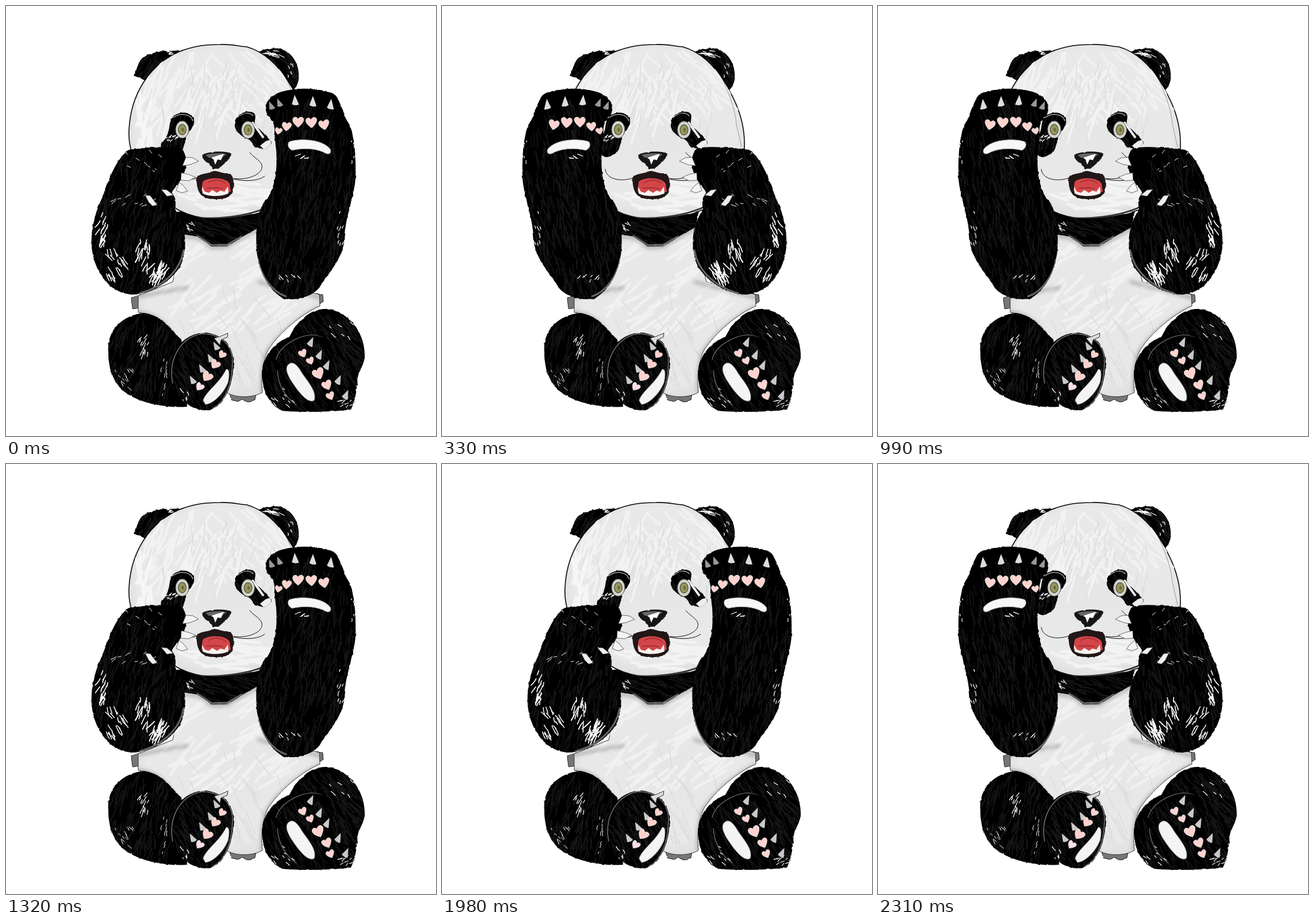
Write an HTML page that moves like this. It is 748 px wide and 748 px high and loops after 2.64 s.

```html
<!DOCTYPE html>
<html lang="en">
<head>
<meta charset="utf-8">
<title>Waving panda</title>
<style>
html, body { margin: 0; width: 100%; height: 100%; overflow: hidden; background: #fff; }
svg { display: block; width: 100vw; height: 100vh; }
</style>
</head>
<body>
<svg id="stage" viewBox="0 0 748 748">
  <defs>
    <radialGradient id="skin" cx=".5" cy=".48" r=".56">
      <stop offset="0" stop-color="#e6e6e6"/>
      <stop offset=".8" stop-color="#e9e9e9"/>
      <stop offset=".95" stop-color="#dedede"/>
      <stop offset="1" stop-color="#c8c8c8"/>
    </radialGradient>
    <filter id="soft" x="-30%" y="-30%" width="160%" height="160%"><feGaussianBlur stdDeviation="3"/></filter>
    <filter id="rough" x="-5%" y="-5%" width="110%" height="110%">
      <feTurbulence type="fractalNoise" baseFrequency=".14" numOctaves="2" seed="4"/>
      <feDisplacementMap in="SourceGraphic" scale="3" xChannelSelector="R" yChannelSelector="G"/>
    </filter>
  </defs>
  <g id="panda"></g>
</svg>
<script>
const NS = 'http://www.w3.org/2000/svg';
const STEP = 330;
const panda = document.getElementById('panda');
const defs = document.querySelector('defs');

let seed = 17;
const random = () => (seed = seed * 16807 % 2147483647) / 2147483647;
const spread = size => (random() - 0.5) * size;

function add(parent, tag, attrs = {}) {
  const node = document.createElementNS(NS, tag);
  for (const key in attrs) node.setAttribute(key, attrs[key]);
  return parent.appendChild(node);
}
const path = (parent, d, fill, attrs) => add(parent, 'path', { d, fill, ...attrs });
const line = (parent, d, width = 1, stroke = '#111') =>
  path(parent, d, 'none', { stroke, 'stroke-width': width, 'stroke-linecap': 'round' });
const oval = (parent, cx, cy, rx, ry, fill, attrs) =>
  add(parent, 'ellipse', { cx, cy, rx, ry, fill, ...attrs });

// Short curved hairs scattered over an elliptical patch; angle in degrees.
function hairs(parent, [cx, cy, rx, ry], angle, count, length, color, width = 1) {
  let d = '';
  for (let i = 0; i < count; i++) {
    const turn = random() * 2 * Math.PI, reach = Math.sqrt(random());
    const x = cx + rx * reach * Math.cos(turn), y = cy + ry * reach * Math.sin(turn);
    const a = (angle + spread(36)) * Math.PI / 180, l = length * (0.5 + random());
    const dx = Math.cos(a) * l, dy = Math.sin(a) * l;
    d += `M${x.toFixed(1)},${y.toFixed(1)}q${(dx / 2 + spread(4)).toFixed(1)},${(dy / 2).toFixed(1)} ${dx.toFixed(1)},${dy.toFixed(1)}`;
  }
  line(parent, d, width, color);
}

// A filled outline plus a group clipped to it for texture.
let clipCount = 0;
function region(parent, d, fill, attrs) {
  path(parent, d, fill, attrs);
  const id = 'clip' + clipCount++;
  path(add(defs, 'clipPath', { id }), d);
  return add(parent, 'g', { 'clip-path': `url(#${id})` });
}
function fur(parent, d, area, angle, count = 150) {
  const inner = region(parent, d, '#020202', { filter: 'url(#rough)' });
  hairs(inner, area, angle, count, 22, '#151515', 1.6);
  hairs(inner, area, angle, count / 4, 16, '#222');
  return inner;
}
const shine = (parent, area, angle, count, length = 9, width = 1.2) =>
  hairs(parent, area, angle, count, length, '#fff', width);

function heart(parent, x, y, size, turn = 0, fill = '#fcd3cf') {
  path(parent, 'M0,10C-5,6 -10,1 -9,-4C-8,-9 -2,-9 0,-4C2,-9 9,-9 10,-4C10,1 5,6 0,10Z', fill,
    { transform: `translate(${x} ${y}) rotate(${turn}) scale(${size})`, stroke: '#f5eeee', 'stroke-width': 0.8 });
}
function claw(parent, x, y, size, turn = 0, fill = '#c9c9c9') {
  path(parent, 'M-1,-10C2,-4 5,3 7,8C2,10 -3,9 -6,7Z', fill,
    { transform: `translate(${x} ${y}) rotate(${turn}) scale(${size})` });
}

function drawEars(g) {
  const left = fur(g, 'M222,121C230,108 229,93 244,86L262,80C278,76 296,80 315,75L275,130L243,131C238,126 230,125 222,121Z', [255, 103, 30, 25], 130, 40);
  shine(left, [282, 83, 10, 4], -10, 6, 7);
  const right = fur(g, 'M434,84C446,74 465,71 481,76C501,83 511,106 509,125C508,138 503,143 499,147L465,125Z', [480, 105, 30, 30], 50, 40);
  shine(right, [460, 82, 18, 5], 10, 14, 9);
  shine(right, [495, 115, 8, 18], 70, 5, 5);
}

function drawBody(g) {
  path(g, 'M231,503L218,508L220,527L232,525ZM540,500L551,503L552,514L541,520ZM389,674L392,685L403,688L411,684L421,689L433,685L435,675Z', '#777',
    { stroke: '#222', filter: 'url(#rough)' });
  const body = region(g, 'M310,390L335,402L358,418L385,418L410,402L438,386L460,480L545,502L546,522C515,535 475,568 455,600C444,625 444,650 446,672C430,682 400,682 385,673L330,590L290,580C278,552 255,535 230,533L230,504L290,480Z', 'url(#skin)', { stroke: '#333' });
  hairs(body, [375, 500, 110, 90], -38, 65, 42, '#f1f1f1', 5);
  hairs(body, [390, 560, 90, 90], 65, 35, 35, '#dedede', 2);
  line(body, 'M455,600C444,625 444,650 446,672M312,400L336,404L358,420L385,420L410,404L438,388M230,533C260,535 280,552 292,580M231,505L315,490M440,480L545,507M545,524C515,537 475,570 455,600', 6, '#77777777').setAttribute('filter', 'url(#soft)');
  const neck = fur(g, 'M296,358L450,348L440,385C425,394 416,397 408,404L385,417L358,418L333,401L308,397Z', [370, 385, 70, 28], 20, 60);
  shine(neck, [320, 382, 8, 8], 35, 7, 7);
  line(neck, 'M333,400L358,416L385,415L410,401', 3, '#666');
}

function drawHead(g) {
  const head = region(g, 'M372,67C390,66 405,70 419,71C449,80 473,102 489,130C513,165 528,204 526,248C520,300 490,343 450,356C420,367 380,371 345,369C302,363 270,340 250,310C225,280 212,247 214,215C217,153 250,102 300,80C325,70 345,67 372,67Z', 'url(#skin)', { stroke: '#080808', 'stroke-width': 1.6 });
  hairs(head, [325, 145, 90, 65], 115, 75, 38, '#f2f2f2', 4);
  hairs(head, [405, 130, 80, 55], 45, 45, 34, '#f1f1f1', 4);
  hairs(head, [370, 160, 120, 80], 100, 45, 28, '#dddddd', 1.5);
  hairs(head, [370, 330, 80, 28], 5, 30, 35, '#f3f3f3', 5);
  hairs(head, [240, 200, 16, 65], 97, 16, 34, '#f6f6f6', 5);
  line(head, 'M489,130C505,165 510,185 512,205L521,245', 1, '#999');
  line(head, 'M318,366C360,374 420,366 455,350', 3, '#333');
}

function drawFace(g) {
  const eye = (x, y) => {
    oval(g, x, y, 11.5, 15, '#d5d5cf', { stroke: '#555' });
    oval(g, x, y, 6.8, 9, '#96965e', { stroke: '#55553c', 'stroke-width': 1.4 });
    oval(g, x + 1, y, 2, 3.5, '#6a6a3c');
  };
  const left = fur(g, 'M292,191C306,181 326,185 327,199C329,212 314,221 312,231C311,248 305,260 286,263C274,261 266,245 271,237C280,230 282,221 284,212C285,203 287,195 292,191Z', [300, 225, 25, 35], 100, 30);
  shine(left, [285, 231, 12, 5], -25, 10, 6);
  line(left, 'M291,194C304,185 322,188 325,200', 1.2, '#bbb');
  const right = fur(g, 'M398,202C400,187 423,179 432,187C437,194 429,202 435,208C445,219 458,229 462,239L451,249L433,246C427,236 426,233 417,230C404,223 396,214 398,202Z', [425, 215, 30, 35], 45, 30);
  path(right, 'M442,243L452,235L462,232L460,244L450,251Z', '#eee');
  line(right, 'M429,203L447,228', 4, '#eee');
  line(right, 'M402,194C414,184 424,185 430,191', 1.2, '#bbb');
  eye(306.5, 215);
  eye(421, 215.5);

  path(g, 'M340,260C349,252 384,251 392,257C391,268 374,278 370,283L361,283C357,277 344,271 340,260Z', '#171717', { filter: 'url(#rough)' });
  path(g, 'M347,259C355,256 375,255 384,258L376,263L353,264Z', '#686868');
  path(g, 'M357,264L366,261L379,257L374,268L368,267L364,276L361,267Z', '#fff');

  line(g, 'M396,300C424,304 452,290 444,274C439,266 429,262 424,255M332,299C314,306 286,303 284,284M396,301C418,306 440,304 450,296');
  path(g, 'M331,299C338,290 349,293 358,288C369,285 374,292 388,291C396,295 397,305 395,319C394,331 383,337 361,336C339,335 332,325 331,299Z', '#241717', { filter: 'url(#rough)' });
  path(g, 'M342,306C349,298 380,296 389,309L391,323C377,328 354,329 340,322Z', '#d34548');
  line(g, 'M352,307C363,300 377,303 382,309M349,317L367,316L377,318', 1, '#751f24');
  path(g, 'M341,314L346,323L353,325L359,320L367,325L373,321L380,323L386,314L387,326C374,332 353,332 342,326Z', '#f6f3f0');
}

function drawLegs(g) {
  const thigh = fur(g, 'M178,602C175,565 201,538 240,534C275,539 288,565 305,580L315,697C280,700 230,691 205,670C187,655 178,631 178,602Z', [240, 615, 65, 85], 105);
  shine(thigh, [240, 590, 9, 26], 115, 12, 10);
  shine(thigh, [205, 638, 18, 28], 55, 14, 6, 1);
  shine(thigh, [276, 645, 6, 40], 95, 10, 6, 1);

  const foot = fur(g, 'M286,635C284,600 310,570 345,568C376,570 395,590 396,620C395,655 385,690 355,703C330,706 305,690 295,670C288,660 286,650 286,635Z', [340, 635, 55, 70], 60);
  shine(foot, [305, 675, 12, 20], 60, 9, 6);
  line(foot, 'M290,656C280,610 310,571 345,570C377,572 394,592 394,620C393,655 384,686 360,700', 1.5, '#777');
  [[324, 650], [340, 630], [355, 612], [365, 591]].forEach(([x, y]) => claw(g, x, y, 0.85, -25));
  [[337, 662, 0.75], [350, 644, 0.95], [364, 623, 0.85], [376, 606, 0.7]]
    .forEach(([x, y, size], i) => heart(g, x, y, size, 35, i ? '#fcd0cb' : '#fbdfe3'));
  path(g, 'M343,686C348,670 372,656 383,632C389,631 389,642 386,655C378,675 360,692 347,693Z', '#f4f4f4', { stroke: '#aaa' });
  path(g, 'M362,578L372,575L386,569L385,576L374,581L372,590Z', '#ddd', { stroke: '#333' });

  const hip = fur(g, 'M490,582C506,546 530,525 562,527C605,537 625,575 624,612C621,630 608,640 612,660L520,660Z', [565, 580, 65, 55], 50);
  shine(hip, [585, 565, 25, 20], 40, 7, 6);
  const sole = fur(g, 'M445,640C446,600 480,572 520,570C560,570 600,600 610,640C613,665 606,690 600,702C560,707 510,707 480,704C455,690 447,670 445,640Z', [530, 640, 85, 70], 60);
  shine(sole, [590, 690, 15, 9], -35, 10, 6);
  shine(sole, [480, 680, 20, 16], 40, 9, 6);
  line(sole, 'M470,615C475,592 505,575 530,572C559,573 588,590 601,614M472,634C474,660 485,680 505,694', 1.2, '#777');
  [[531, 584], [546, 606], [559, 624], [579, 650], [592, 676]].forEach(([x, y]) => claw(g, x, y, 0.9, 28));
  [[516, 604, 0.75], [529, 617, 0.7], [543, 639, 1.05], [558, 659, 0.9], [564, 678, 0.75]]
    .forEach(([x, y, size]) => heart(g, x, y, size, -25));
  path(g, 'M491,624C499,616 507,625 515,639C526,655 541,671 536,686C524,693 505,666 495,650C488,638 486,629 491,624Z', '#f4f4f4', { stroke: '#aaa' });
}

function drawRaisedArm(g) {
  const arm = fur(g, 'M452,182C451,166 460,155 480,149C510,140 555,143 573,155C585,172 588,193 599,210C606,230 609,260 608,300C604,340 590,365 588,410C585,440 560,465 545,490C535,503 510,513 483,509C458,495 440,465 436,425C433,385 440,345 455,335C470,310 472,280 470,250C465,215 472,205 455,190Z', [520, 340, 95, 180], 100, 420);
  shine(arm, [490, 471, 18, 10], 60, 8, 5);
  shine(arm, [512, 263, 12, 3], -15, 7, 8);
  shine(arm, [583, 385, 6, 35], 110, 8, 6);
  shine(arm, [603, 250, 4, 20], 90, 4, 4);
  line(arm, 'M438,440C444,470 462,497 487,505', 3, '#666');
  [[461, 173, 0.8], [475, 168, 0.8], [503, 164, 0.95], [534, 166, 0.95], [565, 171, 0.95]]
    .forEach(([x, y, size], i) => claw(g, x, y, size, i < 2 ? -18 : i * 5 - 10, i < 2 ? '#999' : '#ddd'));
  [[474, 217, 0.65], [488, 209, 0.85], [508, 201, 1], [531, 202, 1], [553, 206, 0.95]]
    .forEach(([x, y, size], i) => heart(g, x, y, size, 12 - i * 6));
  path(g, 'M493,236C510,230 550,231 564,249C567,257 561,260 552,254C535,247 515,247 498,251C490,248 489,239 493,236Z', '#f7f7f7', { stroke: '#aaa' });
}

function drawFoldedArm(g) {
  const arm = fur(g, 'M214,250C250,246 290,242 306,249C314,258 316,275 310,290C306,305 290,318 288,326C300,335 292,350 296,357C310,380 316,405 308,440C300,470 260,500 220,502C185,500 155,470 149,420C147,390 155,365 160,350C175,320 185,270 214,250Z', [230, 375, 85, 130], 105, 230);
  shine(arm, [170, 385, 8, 28], 112, 20, 11, 1.6);
  shine(arm, [185, 447, 20, 26], 60, 26, 11, 1.5);
  shine(arm, [239, 427, 12, 26], 105, 18, 13, 1.6);
  shine(arm, [270, 457, 15, 16], 120, 27, 14, 1.8);
  shine(arm, [220, 342, 45, 13], -25, 12, 7, 1);
  shine(arm, [230, 270, 45, 22], 35, 11, 5, 1);
  line(arm, 'M309,425C303,462 270,490 232,500', 3, '#666');
  const nails = { stroke: '#444', 'stroke-width': 0.8 };
  path(g, 'M313,263L325,264L335,270L320,276L307,278Z', '#f4f4f4', nails);
  path(g, 'M305,290L318,293L330,298L318,304L304,303Z', '#f4f4f4', nails);
  path(g, 'M301,307L308,312L316,322L306,325L296,321Z', '#f4f4f4', nails);
  path(g, 'M242,329L251,330L263,346L255,348L248,341ZM270,319L280,320L291,329L280,331Z', '#eee', nails);
}

[drawEars, drawBody, drawHead, drawFace, drawLegs].forEach(draw => draw(add(panda, 'g')));
const arms = add(panda, 'g');
drawFoldedArm(arms);
drawRaisedArm(arms);

// The arms swap sides by mirroring about the stage centre.
function render(time) {
  const swapped = Math.floor(time / STEP) % 2 === 1;
  arms.setAttribute('transform', swapped ? 'matrix(-1 0 0 1 748 0)' : 'matrix(1 0 0 1 0 0)');
}
const start = performance.now();
function tick() {
  render(performance.now() - start);
  requestAnimationFrame(tick);
}
tick();
</script>
</body>
</html>
```
